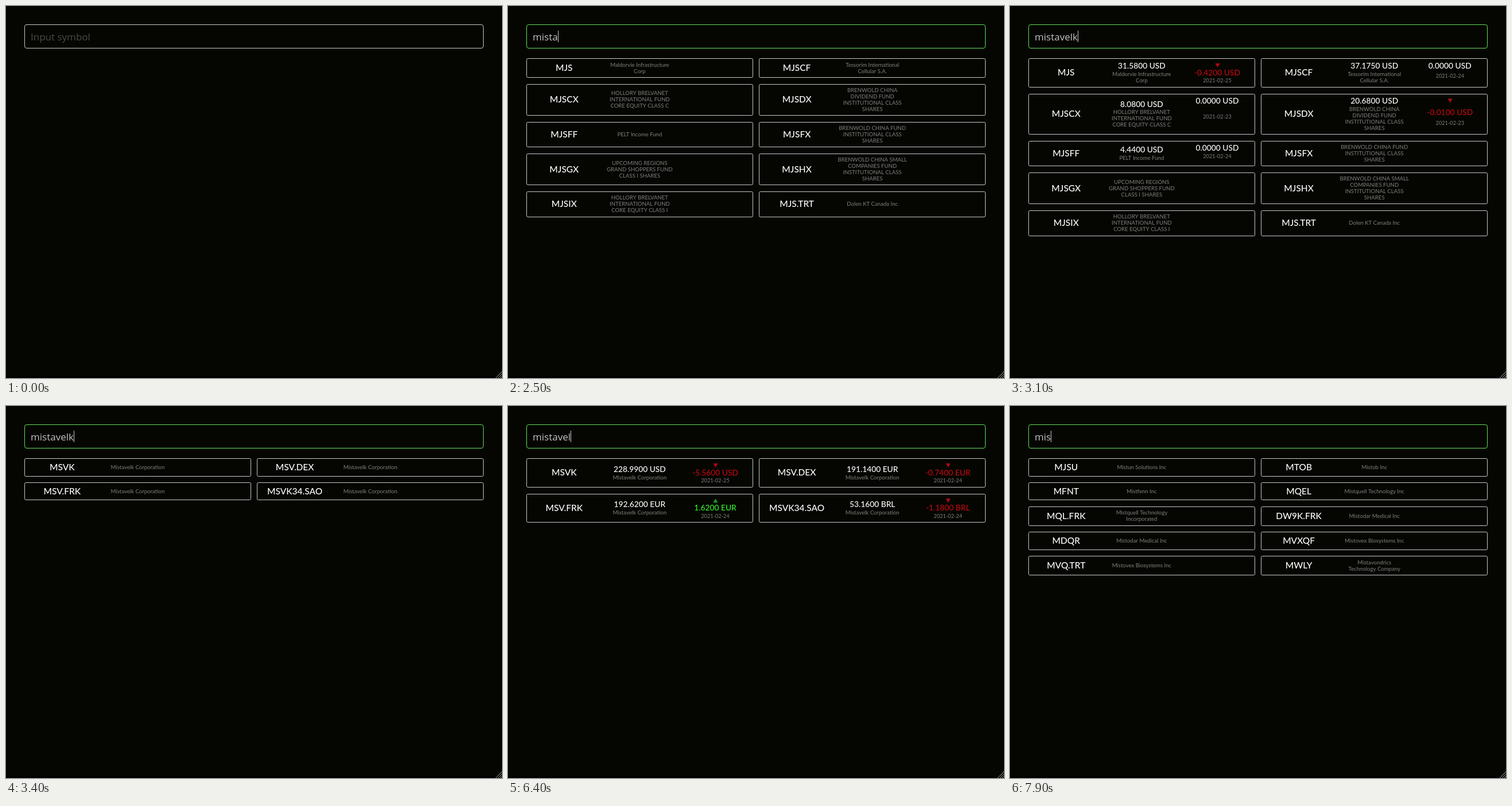
These frames come from a looping animation (864 by 648 pixels, 8000 ms). An HTML page with a canvas:

```html
<!DOCTYPE html>
<html lang="en">
<head>
<meta charset="utf-8">
<title>Symbol search</title>
<style>
  html, body { margin: 0; width: 100%; height: 100%; overflow: hidden; background: #050601; }
  canvas { display: block; width: 864px; height: 648px; }
</style>
</head>
<body>
<canvas id="stage" width="864" height="648"></canvas>
<script>
const ctx = document.getElementById('stage').getContext('2d');
const LOOP = 8000;
const QUERY = 'mistavelk';
const FONT = {
  input: '17px "Open Sans", "Noto Sans", sans-serif',
  symbol: '500 15.5px Lato, sans-serif',
  price: '500 13.8px Lato, sans-serif',
  name: '9.6px Lato, sans-serif',
  date: '9.2px Lato, sans-serif'
};
const RED = '#c00812', GREEN = '#35f02c', GREY = '#808080', LINE = '#c8c8c8';

// symbol, name lines, price, change, currency, date
const stock = (symbol, name, price, change, cur, date) =>
  ({ symbol, lines: name.split('|'), price, change, cur, date });

const similar = [
  stock('MJS', 'Maldorvie Infrastructure|Corp', 31.58, -0.42, 'USD', '2021-02-25'),
  stock('MJSCF', 'Tessorim International|Cellular S.A.', 37.175, 0, 'USD', '2021-02-24'),
  stock('MJSCX', 'HOLLORY BRELVANET|INTERNATIONAL FUND|CORE EQUITY CLASS C', 8.08, 0, 'USD', '2021-02-23'),
  stock('MJSDX', 'BRENWOLD CHINA|DIVIDEND FUND|INSTITUTIONAL CLASS|SHARES', 20.68, -0.01, 'USD', '2021-02-23'),
  stock('MJSFF', 'PELT Income Fund', 4.44, 0, 'USD', '2021-02-24'),
  stock('MJSFX', 'BRENWOLD CHINA FUND|INSTITUTIONAL CLASS|SHARES'),
  stock('MJSGX', 'UPCOMING REGIONS|GRAND SHOPPERS FUND|CLASS I SHARES'),
  stock('MJSHX', 'BRENWOLD CHINA SMALL|COMPANIES FUND|INSTITUTIONAL CLASS|SHARES'),
  stock('MJSIX', 'HOLLORY BRELVANET|INTERNATIONAL FUND|CORE EQUITY CLASS I'),
  stock('MJS.TRT', 'Dolen KT Canada Inc')
];
const exact = [
  stock('MSVK', 'Mistavelk Corporation', 228.99, -5.56, 'USD', '2021-02-25'),
  stock('MSV.DEX', 'Mistavelk Corporation', 191.14, -0.74, 'EUR', '2021-02-24'),
  stock('MSV.FRK', 'Mistavelk Corporation', 192.62, 1.62, 'EUR', '2021-02-24'),
  stock('MSVK34.SAO', 'Mistavelk Corporation', 53.16, -1.18, 'BRL', '2021-02-24')
];
const related = [
  stock('MJSU', 'Mistun Solutions Inc'),
  stock('MTOB', 'Mistob Inc'),
  stock('MFNT', 'Mistfenn Inc'),
  stock('MQEL', 'Mistquell Technology Inc'),
  stock('MQL.FRK', 'Mistquell Technology|Incorporated'),
  stock('DW9K.FRK', 'Mistodar Medical Inc'),
  stock('MDQR', 'Mistodar Medical Inc'),
  stock('MVXQF', 'Mistovex Biosystems Inc'),
  stock('MVQ.TRT', 'Mistovex Biosystems Inc'),
  stock('MWLY', 'Mistavondrics|Technology Company')
];

// [time, letters typed]
const typing = [[0, 0], [1500, 1], [1700, 2], [1800, 3], [2200, 4], [2500, 5], [2600, 6], [2700, 7],
  [2900, 8], [3100, 9], [6400, 8], [6700, 7], [6900, 6], [7100, 5], [7300, 4], [7900, 3]];
// [time, results, how many have a quote]
const results = [[0, [], 0], [2300, similar, 0], [2600, similar, 1], [2700, similar, 2], [2800, similar, 5],
  [3400, exact, 0], [3800, exact, 2], [4000, exact, 4], [7300, exact, 0], [7600, related, 0]];
const caret = [[0, false], [1000, true], [4100, false], [5300, true]];

const at = (keys, t) => keys.filter(k => k[0] <= t).pop();

function text(str, x, y, font, color, align = 'center') {
  ctx.font = font;
  ctx.fillStyle = color;
  ctx.textAlign = align;
  ctx.fillText(str, x, y);
}

function box(left, top, right, bottom, radius, color) {
  const x = Math.round(left), y = Math.round(top);
  ctx.strokeStyle = color;
  ctx.lineWidth = 1;
  ctx.beginPath();
  ctx.roundRect(x + 0.5, y + 0.5, Math.round(right) - x - 1, Math.round(bottom) - y - 1, radius);
  ctx.stroke();
}

function arrow(x, y, up) {
  const d = up ? -3.5 : 3.5;
  ctx.fillStyle = up ? '#1e9a1a' : '#b00a12';
  ctx.beginPath();
  ctx.moveTo(x - 4, y - d);
  ctx.lineTo(x + 4, y - d);
  ctx.lineTo(x, y + d);
  ctx.fill();
}

const blockHeight = (s, quoted) => s.lines.length * 11 + (quoted ? 16 : 0);

function cardHeight(s, quoted) {
  const min = quoted && s.change ? 50.5 : 31.2;
  return Math.max(min, blockHeight(s, quoted) + 11.5);
}

function drawQuote(s, x, top, h) {
  const label = `${s.change.toFixed(4)} ${s.cur}`;
  const extra = h - 50.5;
  if (!s.change) {
    text(label, x, top + 17.6, FONT.price, '#fff');
    text(s.date, x, top + 33.3 + extra / 2, FONT.date, GREY);
    return;
  }
  const up = s.change > 0;
  arrow(x + 0.5, top + 12.3, up);
  text(label, x, top + 29.7 + extra * 0.35, FONT.price, up ? GREEN : RED);
  text(s.date, x, top + 42 + extra * 0.6, FONT.date, GREY);
}

function drawCard(s, left, top, h, quoted) {
  const mid = top + h / 2;
  let y = mid - blockHeight(s, quoted) / 2;
  box(left, top, left + 394.7, top + h, 2, LINE);
  text(s.symbol, left + 65.8, Math.round(mid + 4.9), FONT.symbol, '#fff');
  if (quoted) {
    text(`${s.price.toFixed(4)} ${s.cur}`, left + 197.4, Math.round(y + 11.9), FONT.price, '#fff');
    drawQuote(s, left + 329, top, h);
    y += 16;
  }
  s.lines.forEach((line, i) =>
    text(line, left + 197.4, Math.round(y + 8.6 + i * 11), FONT.name, GREY));
}

function drawResults(list, quotes) {
  let top = 91.3;
  for (let i = 0; i < list.length; i += 2) {
    const row = [i, i + 1];
    const h = Math.max(...row.map(n => cardHeight(list[n], n < quotes)));
    row.forEach((n, col) => drawCard(list[n], 32 + col * 405.3, top, h, n < quotes));
    top += h + 10.7;
  }
}

function drawInput(t) {
  const typed = QUERY.slice(0, at(typing, t)[1]);
  box(32, 32, 832, 74, 3.5, t < 1000 ? LINE : '#62df56');
  if (typed) text(typed, 43, 60, FONT.input, '#c4c4c4', 'left');
  else text('Input symbol', 43, 60, FONT.input, '#4a4a48', 'left');
  if (at(caret, t)[1]) {
    ctx.font = FONT.input;
    ctx.fillStyle = '#c8c8c8';
    ctx.fillRect(Math.round(43 + ctx.measureText(typed).width), 43, 1, 20);
  }
}

function drawGrip() {
  ctx.strokeStyle = '#a8a8a8';
  ctx.lineWidth = 1;
  ctx.beginPath();
  for (const n of [11, 7, 3]) {
    ctx.moveTo(864 - n, 648);
    ctx.lineTo(864, 648 - n);
  }
  ctx.stroke();
}

function draw(t) {
  ctx.fillStyle = '#050601';
  ctx.fillRect(0, 0, 864, 648);
  ctx.fillStyle = '#000';
  ctx.fillRect(0, 645, 864, 3);
  drawGrip();
  drawInput(t);
  const [, list, quotes] = at(results, t);
  drawResults(list, quotes);
}

const start = performance.now();
function tick() {
  draw((performance.now() - start) % LOOP);
  requestAnimationFrame(tick);
}
tick();
</script>
</body>
</html>
```
